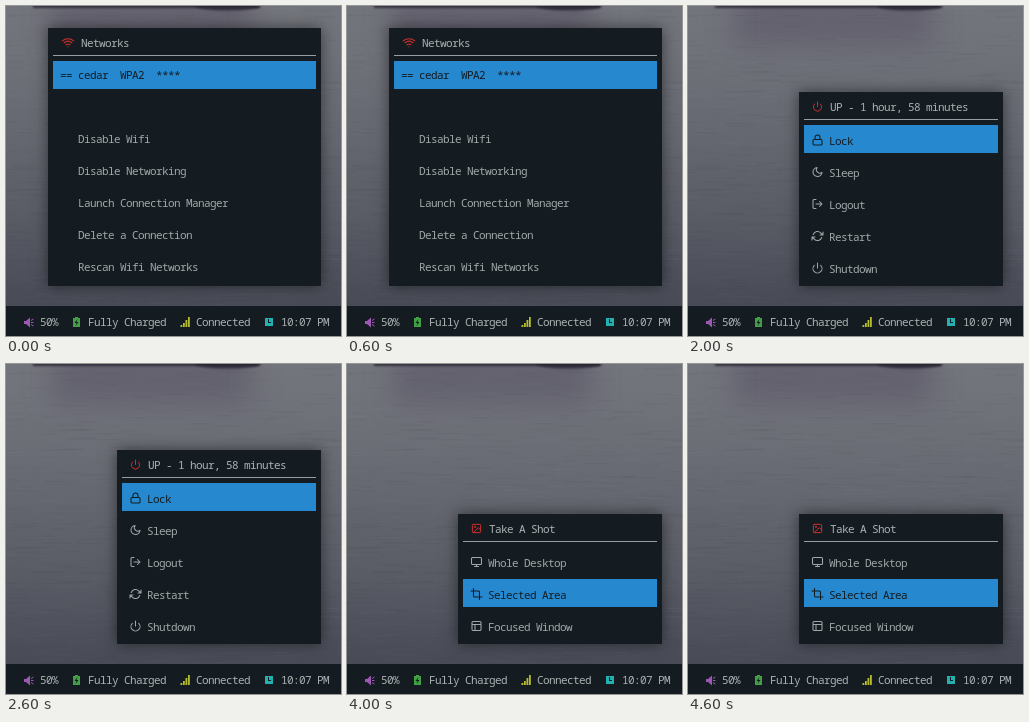
Write an HTML page with a canvas that moves like this. It is 335x330 px and loops after 5 s.

```html
<!DOCTYPE html>
<html lang="en">
<head>
<meta charset="utf-8">
<title>Desktop menus</title>
<style>
html, body { margin: 0; width: 100%; height: 100%; overflow: hidden; background: #141c21; }
canvas { display: block; width: 335px; height: 330px; }
</style>
</head>
<body>
<canvas id="stage"></canvas>
<script>
const W = 335, H = 330, STEP = 1000;
const DARK = '#141c21', BLUE = '#2688cf', LIME = '#a6bd04', RED = '#fd3a34';
const TEXT = '#a2a8a9', HEAD = '#adb2b3', RULE = '#979fa0', ICON_RED = '#d3302f';
const FONT = '300 11px "Noto Sans Mono", "DejaVu Sans Mono", monospace';
const PITCH = 6;

const canvas = document.getElementById('stage');
const scale = window.devicePixelRatio || 1;

function setup(c) {
  c.width = W * scale;
  c.height = H * scale;
  const g = c.getContext('2d');
  g.scale(scale, scale);
  return g;
}
const ctx = setup(canvas);

// Icons are line paths on a 24 unit grid.
const box = (x, y, w, h) =>
  `M${x + 2} ${y}h${w - 4}a2 2 0 0 1 2 2v${h - 4}a2 2 0 0 1-2 2h${4 - w}a2 2 0 0 1-2-2v${4 - h}a2 2 0 0 1 2-2z`;
const ring = (x, y, r) => `M${x + r} ${y}a${r} ${r} 0 1 1${-2 * r} 0a${r} ${r} 0 1 1 ${2 * r} 0`;

function gear() {
  let d = '';
  for (let i = 0; i < 32; i++) {
    const a = (i - 0.5) / 32 * Math.PI * 2;
    const r = i % 4 < 2 ? 11 : 8.3;
    d += `${i ? 'L' : 'M'}${(12 + r * Math.cos(a)).toFixed(2)} ${(12 + r * Math.sin(a)).toFixed(2)}`;
  }
  return d + 'z';
}

const shapes = {
  wifi: 'M5 12.5a11 11 0 0 1 14 0M1.4 9a16 16 0 0 1 21.2 0M8.5 16.1a6 6 0 0 1 7 0M12 20h.01',
  music: 'M9 18V5l12-2v13' + ring(6, 18, 3) + ring(18, 16, 3),
  play: 'M5 3l14 9-14 9z',
  stop: 'M3 3h18v18H3z',
  prev: 'M19 20L9 12l10-8zM5 19V5',
  next: 'M5 4l10 8-10 8zM19 5v14',
  repeat: 'M17 1l4 4-4 4M3 11V9a4 4 0 0 1 4-4h14M7 23l-4-4 4-4M21 13v2a4 4 0 0 1-4 4H3',
  shuffle: 'M16 3h5v5M4 20L21 3M21 16v5h-5M15 15l6 6M4 4l5 5',
  lock: box(3, 11, 18, 11) + 'M7 11V7a5 5 0 0 1 10 0v4',
  moon: 'M21 12.8A9 9 0 1 1 11.2 3 7 7 0 0 0 21 12.8z',
  logout: 'M9 21H5a2 2 0 0 1-2-2V5a2 2 0 0 1 2-2h4M16 17l5-5-5-5M21 12H9',
  restart: 'M23 4v6h-6M1 20v-6h6M3.5 9a9 9 0 0 1 14.9-3.4L23 10M1 14l4.6 4.4A9 9 0 0 0 20.5 15',
  power: 'M18.4 6.6a9 9 0 1 1-12.8 0M12 2v10',
  feed: 'M4 11a9 9 0 0 1 9 9M4 4a16 16 0 0 1 16 16' + ring(5, 19, 1),
  cast: 'M5 17H4a2 2 0 0 1-2-2V5a2 2 0 0 1 2-2h16a2 2 0 0 1 2 2v10a2 2 0 0 1-2 2h-1M12 15l5 6H7z',
  gear: gear() + ring(12, 12, 3),
  edit: 'M11 4H4a2 2 0 0 0-2 2v14a2 2 0 0 0 2 2h14a2 2 0 0 0 2-2v-7M18.5 2.5a2.1 2.1 0 0 1 3 3L12 15l-4 1 1-4z',
  monitor: box(2, 3, 20, 14) + 'M8 21h8M12 17v4',
  crop: 'M6 1v15a2 2 0 0 0 2 2h15M1 6h15a2 2 0 0 1 2 2v15',
  layout: box(3, 3, 18, 18) + 'M3 9h18M9 21V9',
  image: box(3, 3, 18, 18) + ring(8.5, 8.5, 1.5) + 'M21 15l-5-5L5 21'
};
const icons = {};
for (const name in shapes) icons[name] = new Path2D(shapes[name]);

function icon(name, cx, cy, color, size = 12) {
  ctx.save();
  ctx.translate(cx - size / 2, cy - size / 2);
  ctx.scale(size / 24, size / 24);
  ctx.lineWidth = 2.1;
  ctx.lineCap = ctx.lineJoin = 'round';
  ctx.strokeStyle = color;
  ctx.stroke(icons[name]);
  ctx.restore();
}

function rect(x, y, w, h, color) {
  ctx.fillStyle = color;
  ctx.fillRect(x, y, w, h);
}

function poly(points, color) {
  ctx.fillStyle = color;
  ctx.beginPath();
  points.forEach(([x, y]) => ctx.lineTo(x, y));
  ctx.fill();
}

function text(s, x, y, color) {
  ctx.font = FONT;
  ctx.letterSpacing = '0px';
  ctx.letterSpacing = (PITCH - ctx.measureText('0').width).toFixed(3) + 'px';
  ctx.fillStyle = color;
  ctx.fillText(s, x, y);
}

// Each row: [icon, label, highlight colour]
const menus = [
  {
    x: 42, y: 22, icon: 'wifi', ix: 62, iw: 13, title: 'Networks', tx: 75, textX: 54, base: 18,
    rows: [
      ['', '== cedar  WPA2  ****', BLUE],
      ['', ''],
      ['', '   Disable Wifi'],
      ['', '   Disable Networking'],
      ['', '   Launch Connection Manager'],
      ['', '   Delete a Connection'],
      ['', '   Rescan Wifi Networks']
    ]
  },
  {
    x: 111, y: 54, icon: 'music', ix: 131, iw: 13, title: 'Lantern Meadow', tx: 144,
    rows: [
      ['play', 'Play', BLUE],
      ['stop', 'Stop'],
      ['prev', 'Previous'],
      ['next', 'Next'],
      ['repeat', 'Repeat', LIME],
      ['shuffle', 'Shuffle', RED]
    ]
  },
  {
    x: 111, y: 86, icon: 'power', ix: 129.5, iw: 11, title: 'UP - 1 hour, 58 minutes', tx: 142,
    rows: [
      ['lock', 'Lock', BLUE],
      ['moon', 'Sleep'],
      ['logout', 'Logout'],
      ['restart', 'Restart'],
      ['power', 'Shutdown']
    ]
  },
  {
    x: 111, y: 118, icon: 'feed', ix: 131, iw: 13, title: 'cedar : 106.215.253.103', tx: 144,
    rows: [
      ['wifi', 'Connected To Internet', LIME],
      ['cast', 'Open Bandwidth Monitor', BLUE],
      ['gear', 'Open Network Manager'],
      ['edit', 'Open Connection Editor']
    ]
  },
  {
    x: 111, y: 150, icon: 'image', ix: 129.5, iw: 11, title: 'Take A Shot', tx: 142,
    rows: [
      ['monitor', 'Whole Desktop'],
      ['crop', 'Selected Area', BLUE],
      ['layout', 'Focused Window']
    ]
  }
];

function paintSea() {
  const c = document.createElement('canvas');
  const g = setup(c);
  const water = g.createLinearGradient(0, 0, 0, 300);
  [[0, '#73757c'], [0.15, '#70727a'], [0.4, '#676972'], [0.7, '#595b65'], [1, '#484b56']]
    .forEach(([p, color]) => water.addColorStop(p, color));
  g.fillStyle = water;
  g.fillRect(0, 0, W, H);

  let seed = 7;
  const rnd = () => (seed = seed * 16807 % 2147483647) / 2147483647;
  for (let i = 0; i < 900; i++) {
    const y = rnd() * 300, len = 5 + rnd() * 30, x = rnd() * (W + 40) - 40;
    g.fillStyle = rnd() < 0.5 ? 'rgba(30,32,44,.04)' : 'rgba(150,150,165,.04)';
    g.fillRect(x, y, len, 0.6 + rnd());
  }

  // Purple reflection below the dark hull on the top edge
  g.filter = 'blur(14px)';
  g.fillStyle = 'rgba(66,58,84,.3)';
  g.fillRect(45, -20, 200, 60);
  g.filter = 'blur(1px)';
  g.fillStyle = 'rgba(40,38,52,.8)';
  g.fillRect(27, -3, 226, 5);
  g.beginPath();
  g.ellipse(222, 0, 33, 4.5, 0, 0, Math.PI * 2);
  g.fill();
  g.filter = 'none';
  return c;
}
const sea = paintSea();

function drawMenu(m) {
  const w = 315 - m.x, left = m.x + 5;
  ctx.save();
  ctx.shadowColor = 'rgba(0,0,0,.5)';
  ctx.shadowBlur = 14 * scale;
  rect(m.x, m.y, w, 280 - m.y, DARK);
  ctx.restore();

  icon(m.icon, m.ix, m.y + 14.5, ICON_RED, m.iw);
  text(m.title, m.tx, m.y + 19, HEAD);
  rect(left, m.y + 27, w - 10, 1, RULE);

  m.rows.forEach(([name, label, fill], i) => {
    const y = m.y + 33 + i * 32;
    const color = fill ? DARK : TEXT;
    if (fill) rect(left, y, w - 10, 28, fill);
    if (name) icon(name, 129.5, y + 15, color);
    text(label, m.textX || 141, y + (m.base || 20), color);
  });
}

function drawSpeaker(color) {
  poly([[18, 315], [20, 315], [24, 311.5], [24, 321.5], [20, 318], [18, 318]], color);
  ctx.strokeStyle = color;
  ctx.lineWidth = 1;
  ctx.beginPath();
  for (const d of [-1, 0, 1]) {
    ctx.moveTo(25, 316.5 + d * 2);
    ctx.lineTo(27.5, 316.5 + d * 3.5);
  }
  ctx.stroke();
}

function drawBar() {
  rect(0, 300, W, 30, DARK);

  drawSpeaker('#9c58b3');
  text('50%', 34, 320, HEAD);

  rect(67, 312, 7, 9, '#43a047');
  rect(69, 311, 3, 1, '#43a047');
  poly([[71.5, 313], [68.5, 317], [70.5, 317], [69.5, 320], [72.5, 316], [70.5, 316]], DARK);
  text('Fully Charged', 82, 320, HEAD);

  [2, 4, 7, 10].forEach((h, i) => rect(174.5 + i * 2.5, 321 - h, 1.8, h, '#b5bd2c'));
  text('Connected', 190, 320, HEAD);

  rect(259, 312, 8, 8, '#24b0ae');
  rect(262, 313, 1, 4, DARK);
  rect(262, 316, 3, 1, DARK);
  text('10:07 PM', 275, 320, HEAD);
}

function frame() {
  const i = Math.floor(performance.now() / STEP) % menus.length;
  ctx.drawImage(sea, 0, 0, W, H);
  drawMenu(menus[i]);
  drawBar();
  requestAnimationFrame(frame);
}
frame();
</script>
</body>
</html>
```
